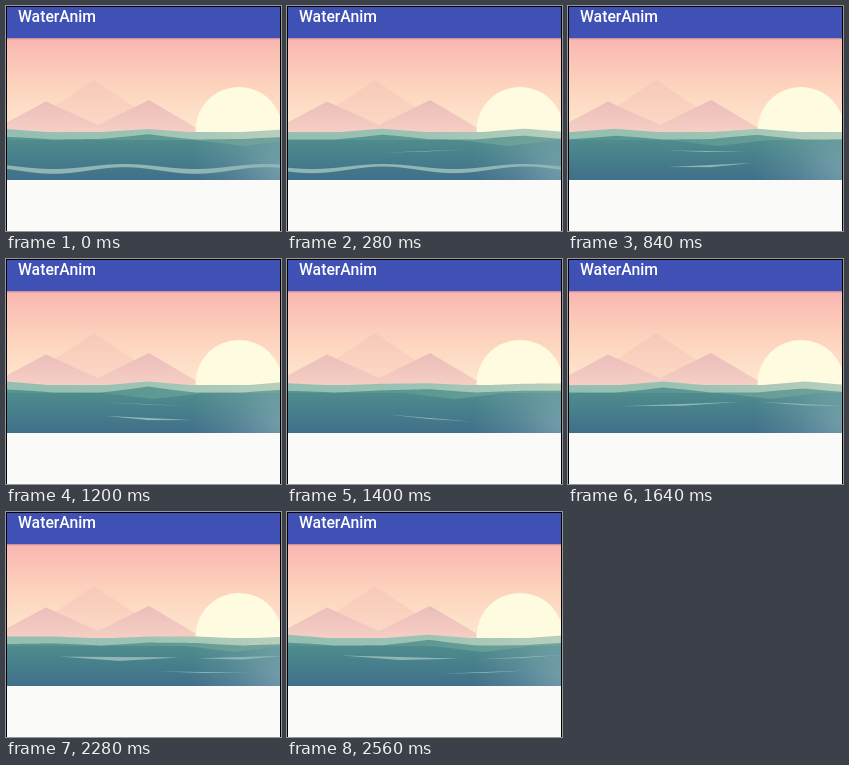
Animation, 275 px wide and 225 px high, one loop 2600 ms. Source, as an HTML page with a canvas:

```html
<!DOCTYPE html>
<html lang="en">
<head>
<meta charset="utf-8">
<title>WaterAnim</title>
<style>
  html, body { margin: 0; width: 100%; height: 100%; overflow: hidden; background: #fafaf9; }
  svg, canvas { position: absolute; left: 0; top: 0; width: 275px; height: 225px; display: block; }
  text { font: 500 15.75px Roboto, sans-serif; fill: #fff; }
</style>
</head>
<body>
<svg viewBox="0 0 275 225">
  <defs>
    <linearGradient id="sky" x2="0" y2="1">
      <stop stop-color="#f9b6b1"/>
      <stop offset=".5" stop-color="#fdd3bd"/>
      <stop offset="1" stop-color="#fee8cf"/>
    </linearGradient>
    <linearGradient id="far" x2="0" y2="1">
      <stop stop-color="#f8c8b8"/>
      <stop offset="1" stop-color="#fcdbc6"/>
    </linearGradient>
    <linearGradient id="near" x2="0" y2="1">
      <stop stop-color="#ebbdba"/>
      <stop offset="1" stop-color="#f6cfc4"/>
    </linearGradient>
    <linearGradient id="shade" x2="0" y2="1">
      <stop stop-color="#7a5a78" stop-opacity=".5"/>
      <stop offset="1" stop-color="#7a5a78" stop-opacity="0"/>
    </linearGradient>
  </defs>
  <rect width="275" height="225" fill="#fafaf9"/>
  <rect y="32" width="275" height="94" fill="url(#sky)"/>
  <path d="M10 126L88 74L166 126Z" fill="url(#far)"/>
  <path d="M-6 120L40 95.500L92 119L143 94L199 127H-6Z" fill="url(#near)"/>
  <circle cx="233" cy="124.500" r="43.500" fill="#fefbe0"/>
  <rect y="126" width="275" height="48" fill="#a0c6b6"/>
  <rect width="275" height="32" fill="#3f51b5"/>
  <rect y="32" width="275" height="2" fill="url(#shade)"/>
  <text x="12" y="16">WaterAnim</text>
  <path d="M0 .5H275M.5 0V225M274.500 0V225" stroke="#000"/>
</svg>
<canvas id="water" width="275" height="225"></canvas>
<script>
const LOOP = 2600, SWELL = 1300, LEAD = 100, STEP = 47.4, MID = 142, BOTTOM = 174;
const ctx = document.getElementById('water').getContext('2d');

// Lens-shaped glints: lifetime, centre, half width, height, thickness, rocking
const glints = [
  { from: 0, to: 1400, x: 138, w: 42, y: 145, thick: 1, rock: 2 },
  { from: 1400, to: 3000, x: 113, w: 60, y: 145, thick: 4, rock: 2.5 },
  { from: 1450, to: 2700, x: 235, w: 44, y: 145, thick: 3, rock: -2.5 },
  { from: 500, to: 1540, x: 142, w: 43, y: 159, thick: 2.5, rock: 4 },
  { from: 1800, to: 2900, x: 198, w: 46, y: 160, thick: 1, rock: -3 }
];

const mix = (a, b, k) => a + (b - a) * k;
const ease = k => (1 - Math.cos(Math.PI * k)) / 2;

// The crest sits on every third node and hands over to its left neighbour
function swell(t, trough, rise, taper) {
  const p = (t + LEAD) / SWELL * 3, k = Math.floor(p);
  const crest = (n, s) => (n + s) % 3 === 0 ? 1 : 0;
  return x => {
    const n = Math.floor(x / STEP);
    const lift = i => mix(crest(i, k), crest(i, k + 1), ease(p - k));
    const size = rise * (1 - taper * Math.abs(x - MID) / MID);
    return trough - size * mix(lift(n), lift(n + 1), x / STEP - n);
  };
}

// A shallow notch that sways between the middle and the right
function notch(t) {
  const cx = 190 + 48 * Math.cos(2 * Math.PI * t / 2080);
  return x => 134 + 6 * Math.max(0, 1 - Math.abs(x - cx) / 50);
}

function fillWave(top, ...fills) {
  ctx.beginPath();
  ctx.moveTo(0, BOTTOM);
  for (let x = 0; x <= 275; x++) ctx.lineTo(x, top(x));
  ctx.lineTo(275, BOTTOM);
  for (const fill of fills) {
    ctx.fillStyle = fill;
    ctx.fill();
  }
}

function streak(x0, x1, top, thick) {
  ctx.fillStyle = '#8fb5b4';
  for (let x = x0; x < x1; x++) {
    const h = thick(x);
    if (h > 0) ctx.fillRect(x, top(x), 1, h);
  }
}

function drawGlint(g, t) {
  const p = (t - g.from) / (g.to - g.from);
  if (p <= 0 || p >= 1) return;
  const u = x => (x - g.x) / g.w;
  const tilt = -g.rock * Math.cos(Math.PI * p), size = g.thick * Math.sin(Math.PI * p);
  streak(g.x - g.w, g.x + g.w, x => g.y + tilt * u(x), x => size * (1 - Math.abs(u(x))));
}

// A full-width ribbon that thins out as the loop begins
function drawRibbon(t) {
  const wave = x => Math.cos(2 * Math.PI * (x - 118 + t * .08) / MID);
  const size = 4 * (1 - (t / 700) ** 2);
  if (size > 0) streak(1, 274, x => 160.5 - 2.5 * wave(x), x => size - .8 * wave(x));
}

function gradient(g, ...stops) {
  stops.forEach((c, i) => g.addColorStop(i / (stops.length - 1), c));
  return g;
}

const foam = gradient(ctx.createLinearGradient(0, 0, 275, 0), '#93beb1', '#9cc3b4', '#b8cfbd');
const teal = gradient(ctx.createLinearGradient(0, 0, 275, 0), '#559490', '#5d9893', '#73a49b');
const deep = gradient(ctx.createLinearGradient(0, 130, 0, BOTTOM), '#528f8e', '#477f8b', '#406f8a');
const glow = gradient(ctx.createRadialGradient(275, 165, 2, 275, 165, 90),
  'rgba(170,200,205,.45)', 'rgba(170,200,205,.18)', 'rgba(170,200,205,0)');

ctx.beginPath();
ctx.rect(1, 110, 273, BOTTOM - 110);
ctx.clip();

function draw() {
  const t = Math.floor(performance.now() % LOOP / 40) * 40;
  ctx.clearRect(0, 0, 275, 225);
  fillWave(swell(t, 126.5, 4, 0), foam);
  fillWave(swell(t, 133.5, 6, .5), teal);
  fillWave(notch(t), deep, glow);
  drawRibbon(t);
  glints.forEach(g => drawGlint(g, t));
  requestAnimationFrame(draw);
}
draw();
</script>
</body>
</html>
```
